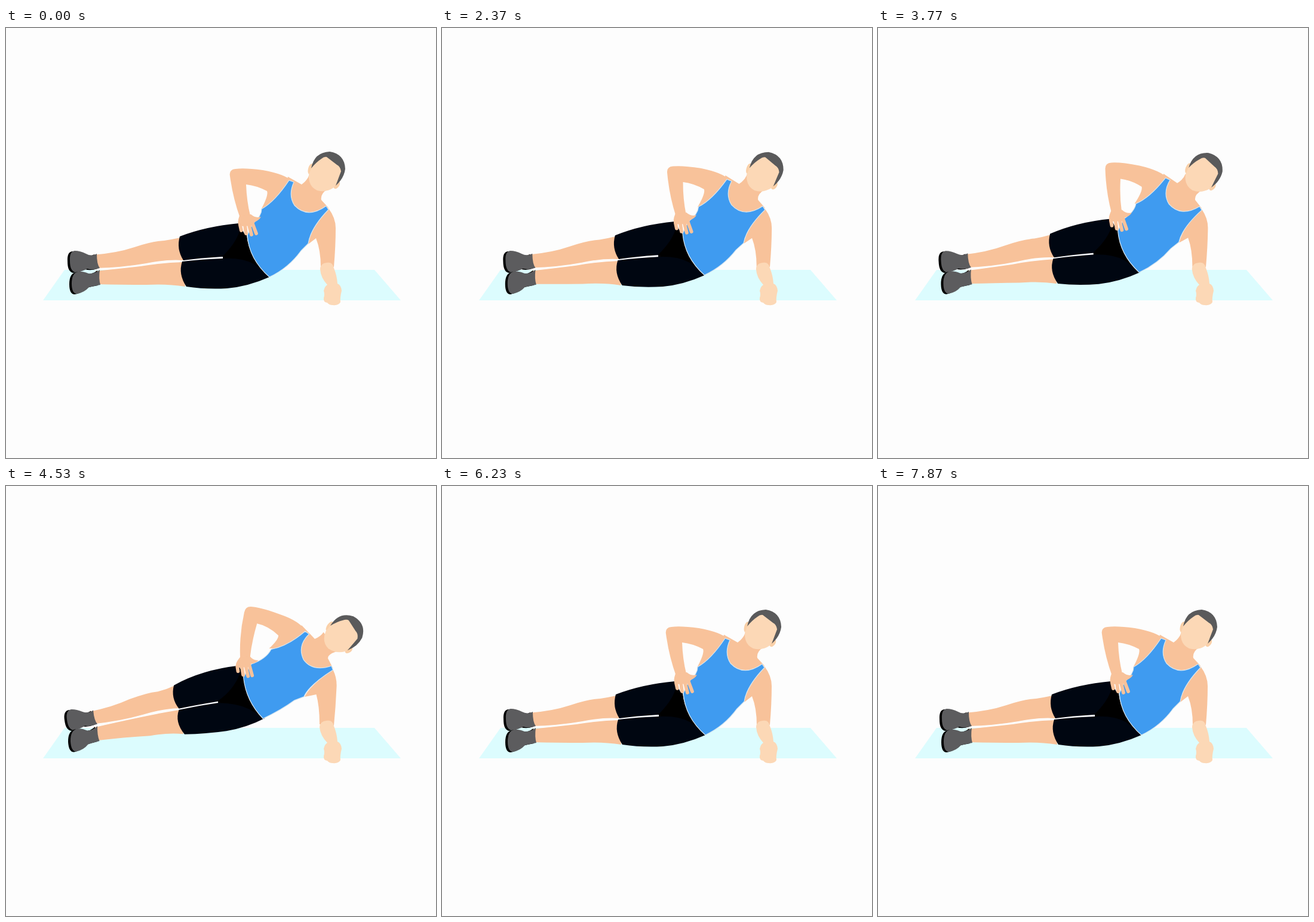
Write an HTML page that moves like this. It is 720 px wide and 720 px high and loops after 8 s.

```html
<!DOCTYPE html>
<html lang="en">
<head>
<meta charset="utf-8">
<title>Side plank hip lift</title>
<style>
  html, body { margin: 0; width: 100%; height: 100%; overflow: hidden; background: #fdfdfd; }
  svg { display: block; width: 100vw; height: 100vh; }
</style>
</head>
<body>
<svg id="stage" viewBox="0 0 720 720">
  <path fill="#dcfcfe" d="M98 405H617L661 456H62Z"/>
  <g id="body"></g>
  <g id="head">
    <g fill="#fad0a8">
      <ellipse cx="510" cy="236" rx="4" ry="9" transform="rotate(15 510 236)"/>
      <ellipse cx="554" cy="263" rx="4" ry="7" transform="rotate(35 554 263)"/>
    </g>
    <path fill="#fcd8b6" d="M512 232Q520 216 535 213Q556 222 562 236Q560 250 549 267Q536 276 521 272Q506 265 507 246Z"/>
    <path fill="#5a5a5b" d="M511 235Q516 208 542 207Q567 211 568 236Q566 252 552 264L561 240Q560 232 554 229L537 216Q533 215 528 219Q519 225 511 235Z"/>
  </g>
</svg>
<script>
const SKIN = '#f8c29a', LIGHT = '#fcd8b6', SHORTS = '#000611', SHOE = '#5c5c5e', SHIRT = '#3f9bf0';
const LOOP = 8000, PIVOT = [480, 300];

// Each part: lowered outline, raised outline, turn in degrees, attributes.
const shoe1 = [
  'M152 378Q143 383 134 378Q124 373 115 373Q106 374 107 390Q107 407 116 409Q128 408 136 403Q146 406 157 402Q152 396 152 378Z',
  'M140 373Q131 380 122 378Q110 374 103 375Q93 378 97 393Q101 409 111 409Q122 405 128 400Q138 400 149 395Q143 390 140 373Z'];
const shoe2 = [
  'M157 405Q148 412 138 411Q128 407 121 408Q110 410 110 428Q110 445 119 445Q131 443 139 434Q147 432 158 430Q155 420 157 405Z',
  'M149 399Q143 407 134 408Q124 403 117 405Q105 409 106 427Q108 445 117 444Q129 441 136 431Q143 428 155 424Q150 415 149 399Z'];
const hand = [
  'M391 314L410 312Q418 319 427 316Q424 322 416 325L415 331L391 332Q386 328 391 314Z',
  'M402 260L416 258Q420 266 428 266Q424 270 414 269L414 274L390 276Q386 269 402 260Z'];
const fingers = [
  'M392 330L394 339M400 330L402 344M407 330L411 346M413 328L419 344',
  'M391 274L392 281M399 272L401 289M406 272L409 291M412 268L415 290'];
const sole = { fill: '#000', transform: 'translate(-4 1)' };

const parts = [
  ['M145 380Q185 377 215 367Q245 357 265 356Q278 354 292 351L297 389Q270 387 235 394Q195 401 150 402Z',
   'M133 376Q170 364 198 347Q225 335 243 332Q257 328 270 318L281 355Q255 358 222 372Q185 387 141 395Z',
   0, { fill: SKIN }],
  ['M150 407Q190 403 225 399Q260 393 297 392L300 433Q270 428 235 430Q195 430 151 429Z',
   'M144 402Q182 388 218 377Q250 368 285 357L294 397Q272 397 248 406Q200 411 148 424Z',
   0, { fill: SKIN }],
  [...shoe1, 0, sole],
  [...shoe1, 0, { fill: SHOE }],
  [...shoe2, 0, sole],
  [...shoe2, 0, { fill: SHOE }],
  // shorts
  ['M291 349Q335 332 390 327L402 350L400 385L362 383Q325 385 297 389Q285 370 291 349Z',
   'M271 318Q320 283 389 274L400 292L402 345L347 338Q312 348 282 356Q266 340 271 318Z',
   0, { fill: SHORTS }],
  ['M363 382Q385 360 391 340L403 347Q407 385 441 417Q410 408 363 388Z',
   'M347 337Q378 322 392 288L399 295Q403 330 425 361Q395 358 347 343Z',
   0, { fill: '#000' }],
  ['M295 391Q330 387 362 386Q395 384 415 395L441 417Q405 433 370 436Q335 438 302 433Q288 412 295 391Z',
   'M284 358Q315 348 346 340Q375 341 400 352L426 360Q400 376 368 384Q335 392 296 398Q276 378 284 358Z',
   0, { fill: SHORTS }],
  // bent arm
  ['M478 256Q468 245 430 238Q400 234 384 236Q373 237 375 248Q380 285 392 318L409 314Q403 290 402 262Q420 264 437 273Q440 280 427 304Q465 295 480 264Z',
   'M534 242Q523 216 500 206Q470 185 452 179Q441 175 435 184Q412 220 401 263L417 262Q430 235 450 206Q470 213 484 236Q482 242 467 248Q500 260 533 246Z',
   30, { fill: SKIN }],
  // neck and chest
  ['M472 249L495 262Q505 255 508 245L538 270Q526 278 528 288L540 301L505 322L464 290Z',
   'M522 222L541 255Q550 255 556 250L568 288Q549 290 551 293L555 311L520 308L505 268Z',
   15, { fill: SKIN }],
  // supporting arm
  ['M540 302Q552 318 552 335Q552 365 549 400L527 400Q527 372 519 352L506 362Q510 335 540 302Z',
   'M555 313Q557 325 555 340Q552 375 549 402L523 398Q523 365 520 346L494 344Q508 332 555 313Z',
   0, { fill: SKIN }],
  ['M526 404Q526 394 537 393Q547 391 549 402Q554 414 555 428Q561 430 562 440Q559 452 560 459Q557 465 547 464Q541 464 538 460Q531 459 532 452Q534 446 532 440Q534 432 538 430Q527 418 526 404Z',
   'M524 404Q525 394 536 393Q547 391 549 402Q554 414 555 428Q561 430 562 440Q559 452 560 459Q557 465 547 464Q541 464 538 460Q531 459 532 452Q534 446 532 440Q534 432 538 430Q526 418 524 404Z',
   0, { fill: LIGHT }],
  // tank top
  ['M474 255Q450 291 428 303Q428 315 413 328L404 347Q407 387 441 417Q473 402 494 373L506 361Q510 335 540 304L536 298Q505 320 483 297Q472 280 482 258Z',
   'M531 238Q497 252 467 248Q448 267 415 268L397 292Q402 332 426 361Q455 347 476 343L494 344Q505 332 555 314L554 307Q524 306 515 288Q506 258 536 244Z',
   15, { fill: SHIRT, stroke: '#d6e6f0', 'stroke-width': 1.2, 'stroke-linejoin': 'round' }],
  [...hand, 30, { fill: SKIN }],
  [...fingers, 30, { fill: 'none', stroke: SKIN, 'stroke-width': 5.8, 'stroke-linecap': 'round' }]
];

// [start, end, raised at end]
const moves = [
  [400, 1130, 1], [1370, 2030, 0], [2330, 3030, 1], [3170, 3870, 0],
  [4170, 4900, 1], [5030, 5740, 0], [6230, 6980, 1], [7270, 7870, 0]
];

const turn = (x, y, deg) => {
  const a = deg * Math.PI / 180, c = Math.cos(a), s = Math.sin(a);
  return [x * c - y * s, x * s + y * c];
};

const points = d => {
  const n = d.match(/\d+/g).map(Number), out = [];
  for (let i = 0; i < n.length; i += 2) out.push([n[i] - PIVOT[0], n[i + 1] - PIVOT[1]]);
  return out;
};

const body = document.getElementById('body');
const head = document.getElementById('head');

const shapes = parts.map(([low, high, deg, attrs]) => {
  const el = document.createElementNS('http://www.w3.org/2000/svg', 'path');
  for (const k in attrs) el.setAttribute(k, attrs[k]);
  body.append(el);
  return { el, deg, form: low, a: points(low), b: points(high).map(([x, y]) => turn(x, y, -deg)) };
});

// Blend both outlines in a turning frame so that points travel on arcs.
function outline({ form, a, b, deg }, p) {
  let i = 0;
  return form.replace(/\d+ \d+/g, () => {
    const [x0, y0] = a[i], [x1, y1] = b[i++];
    const [x, y] = turn(x0 + (x1 - x0) * p, y0 + (y1 - y0) * p, deg * p);
    return (x + PIVOT[0]).toFixed(2) + ' ' + (y + PIVOT[1]).toFixed(2);
  });
}

function lift(t) {
  let p = 0;
  for (const [start, end, up] of moves) {
    if (t < start) break;
    const k = Math.min(1, (t - start) / (end - start));
    p = up ? k : 1 - k;
  }
  return p;
}

function pose(p) {
  for (const s of shapes) s.el.setAttribute('d', outline(s, p));
  const arc = 4 * p * (1 - p);
  head.setAttribute('transform',
    `translate(${50 * p + arc} ${15 * p - 2.5 * arc}) rotate(${40 * p} 531 250)`);
}

const begin = performance.now();
function tick() {
  pose(lift((performance.now() - begin) % LOOP));
  requestAnimationFrame(tick);
}
tick();
</script>
</body>
</html>
```
